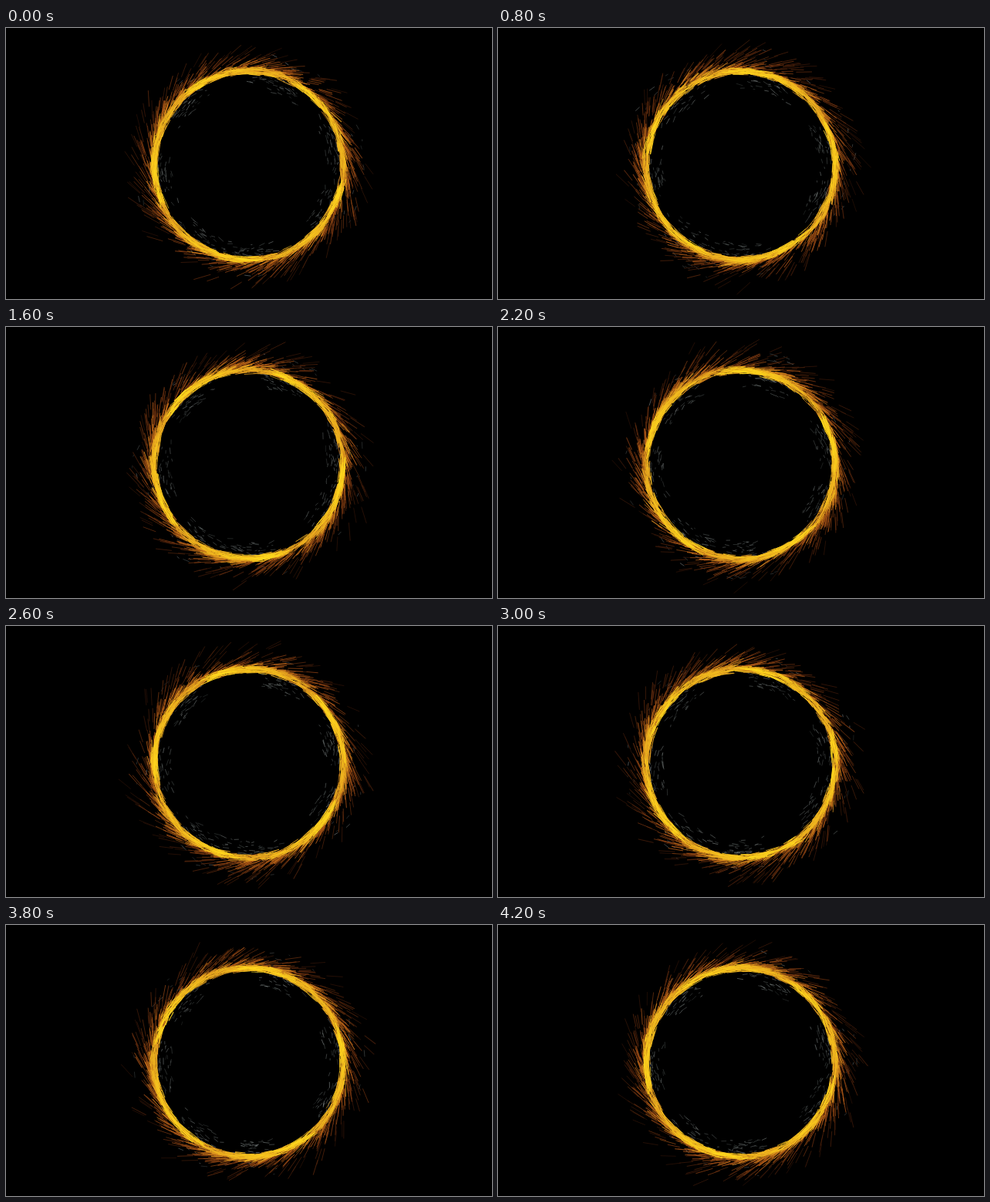
These frames come from a looping animation (630 px wide and 352 px high, 4.3 s). An HTML page with a canvas:

```html
<!DOCTYPE html>
<html lang="en">
<head>
<meta charset="utf-8">
<title>Ring of sparks</title>
<style>
  html, body { margin: 0; width: 100%; height: 100%; overflow: hidden; background: #000; }
  canvas { display: block; width: 630px; height: 352px; }
</style>
</head>
<body>
<canvas id="stage" width="630" height="352"></canvas>
<script>
const ctx = document.getElementById('stage').getContext('2d');
const CX = 314.5, CY = 178.5, R = 122;
const LOOP = 4300, HOLD = 400, STEP = 100, STEPS = 40;
const SPARKS = 2500, ASH = 330;
const EMITTERS = 5, GAP = 360 / EMITTERS;
const LIVES = [4, 5, 8];

// [step, angle of the first emitter in degrees]
const TURN = [[0, 17], [5, -26], [13, -73], [19, -100], [23, -116], [30, -194], [39, -272], [40, -271]];
// [heat, red, green, blue]
const HEAT = [[0, 255, 216, 30], [.3, 232, 166, 32], [.58, 178, 92, 24], [.85, 110, 50, 16], [1.2, 48, 20, 8]];
const ASH_ANGLES = [226, 175, 124, 87, 26, -13, -70];

const rad = deg => deg * Math.PI / 180;

function random(seed) {
  let s = Math.imul(seed + 1, 0x9E3779B1) | 0;
  return () => {
    s = (s + 0x6D2B79F5) | 0;
    let x = Math.imul(s ^ (s >>> 15), 1 | s);
    x = (x + Math.imul(x ^ (x >>> 7), 61 | x)) ^ x;
    return ((x ^ (x >>> 14)) >>> 0) / 4294967296;
  };
}

// Linear lookup in a table whose rows start with the key
function lookup(table, key) {
  let i = 1;
  while (i < table.length - 1 && key > table[i][0]) i++;
  const a = table[i - 1], b = table[i];
  const k = Math.min(1, Math.max(0, (key - a[0]) / (b[0] - a[0])));
  return a.slice(1).map((v, j) => v + (b[j + 1] - v) * k);
}

const emitterAngle = step => lookup(TURN, (step + STEPS) % STEPS)[0];

// A spark leaves the ring along its tangent and cools on the way out
function spark(i, step) {
  const life = LIVES[i % LIVES.length];
  const clock = step + i % life;
  const cycle = Math.floor(clock / life) % (STEPS / life);
  const r = random(i * 16 + cycle);
  const sub = r();
  const age = (clock % life + sub) / life;
  const lag = GAP * Math.pow(r(), 1.6);
  const from = rad(emitterAngle(step - age * life) + GAP * Math.floor(r() * EMITTERS) + lag);
  const reach = 22 + 92 * Math.pow(r(), 1.4);
  const d = reach * age;
  const start = R + (r() + r() - 1) * 5;
  const dir = from + Math.PI / 2 + (r() + r() - 1) * .13;
  const heat = d / 92 + lag / GAP * .28 + (r() - .5) * .24;
  return {
    x: CX + start * Math.cos(from) + d * Math.cos(dir),
    y: CY + start * Math.sin(from) + d * Math.sin(dir),
    dir, heat,
    len: 7 + 7 * r() + reach * .09,
    width: .6 + .45 * r()
  };
}

function line(x, y, dir, len, width, color) {
  ctx.strokeStyle = color;
  ctx.lineWidth = width;
  ctx.beginPath();
  ctx.moveTo(x, y);
  ctx.lineTo(x - len * Math.cos(dir), y - len * Math.sin(dir));
  ctx.stroke();
}

function drawAsh(step) {
  for (let i = 0; i < ASH; i++) {
    const life = LIVES[i % 2];
    const clock = step + i % life;
    const r = random(90000 + i * 16 + Math.floor(clock / life) % (STEPS / life));
    const age = (clock % life) / life;
    const outside = r() < .2;
    const base = ASH_ANGLES[i % ASH_ANGLES.length];
    const a = rad(base + (r() + r() - 1) * 21 + age * 5);
    const depth = Math.pow(r(), 1.5);
    const radius = outside ? R + 30 * depth : R - 3 - 19 * depth;
    const dir = a + Math.PI / 2 + (r() - .5) * .7;
    const tone = 70 + 75 * r();
    line(CX + radius * Math.cos(a), CY + radius * Math.sin(a), dir, 2 + 7 * r(), .7,
      `rgba(${tone},${tone + 7},${tone + 6},${.45 + .4 * r()})`);
  }
}

function draw(step) {
  ctx.fillStyle = '#000';
  ctx.fillRect(0, 0, 630, 352);
  const sparks = Array.from({ length: SPARKS }, (_, i) => spark(i, step));
  sparks.sort((a, b) => b.heat - a.heat);
  drawAsh(step);
  for (const s of sparks) {
    line(s.x, s.y, s.dir, s.len, s.width, `rgb(${lookup(HEAT, s.heat).map(Math.round)})`);
  }
}

let shown = -1;
function tick() {
  const t = performance.now() % LOOP;
  const step = t < HOLD ? 0 : 1 + Math.floor((t - HOLD) / STEP);
  if (step !== shown) draw(shown = step);
  requestAnimationFrame(tick);
}
tick();
</script>
</body>
</html>
```
